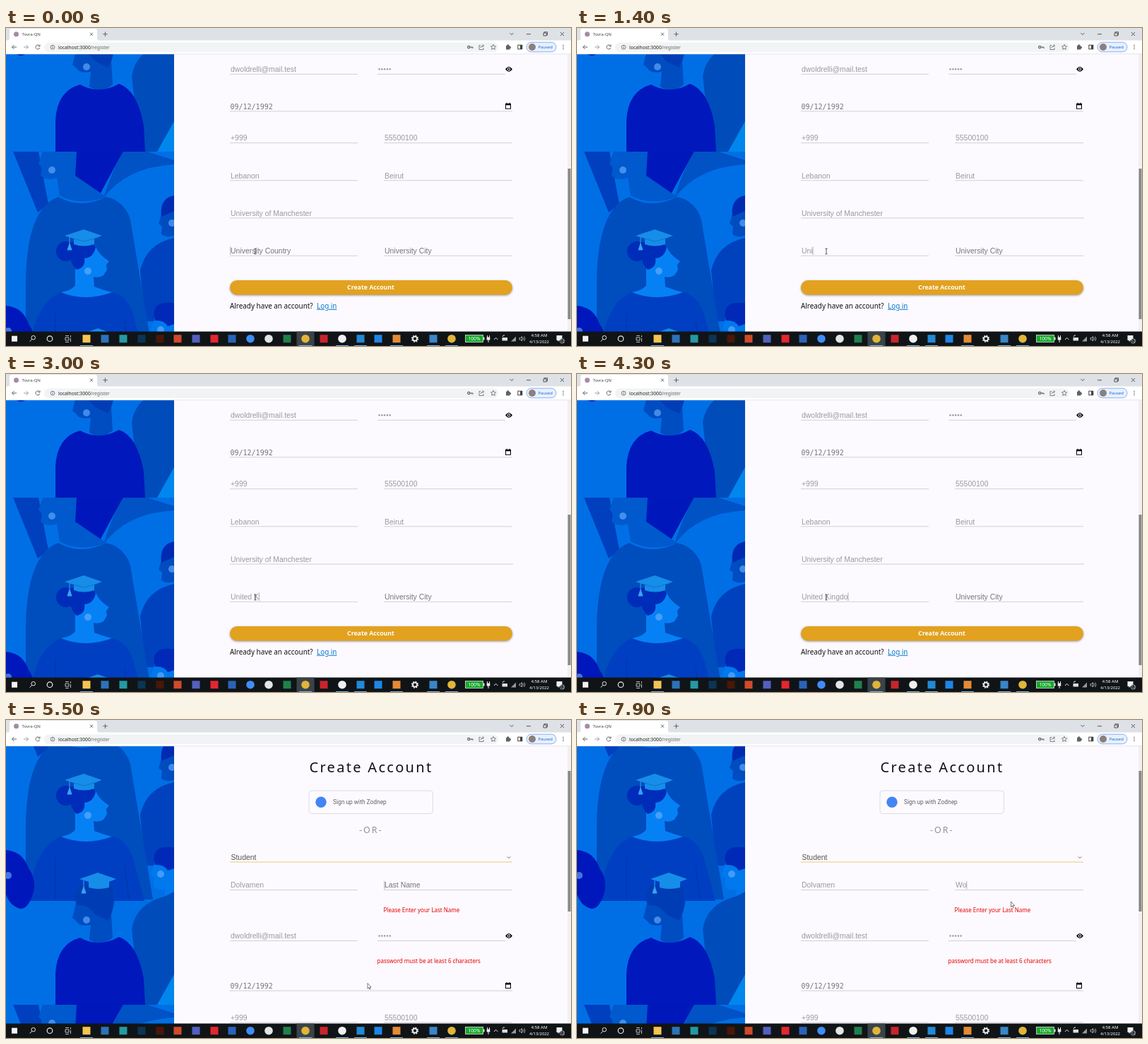
Animation, 800 px wide and 450 px high, one loop 8 s. Source, as an HTML page:

```html
<!DOCTYPE html>
<html lang="en">
<head>
<meta charset="utf-8">
<title>Register form</title>
<style>
  html, body { margin: 0; width: 100%; height: 100%; overflow: hidden; }
  svg { display: block; }
  text { white-space: pre; font-family: "Noto Sans", sans-serif; }
  .input { font: 10.45px "Liberation Sans", Arial, sans-serif; }
  .date { font: 10px "DejaVu Sans Mono", monospace; }
  .line { fill: none; stroke: #5f6368; stroke-width: 1; }
  .white { fill: none; stroke: #e8e8e8; stroke-width: 1; }
</style>
</head>
<body>
<svg id="stage" width="800" height="450" viewBox="0 0 800 450">
  <symbol id="tile" viewBox="0 0 238 437">
    <rect width="238" height="437" fill="#006fe6"/>
    <path d="M10 0H46L60 74L45 86Z" fill="#003fbd"/>
    <path d="M94 0H166Q150 28 130 66L98 40Z" fill="#0018bb"/>
    <path d="M166 0H200L238 12V18Q170 22 138 66Q150 26 166 0Z" fill="#0052c5"/>
    <!-- people on the right -->
    <path d="M238 65Q222 70 221 86L216 102L221 106L220 117Q226 122 238 119Z" fill="#004cc0"/>
    <path d="M238 62Q217 66 220 92L238 84Z" fill="#002ab2"/>
    <path d="M238 122Q199 130 190 168L197 240H238Z" fill="#0042be"/>
    <!-- tall figure -->
    <path d="M52 0L46 17L51 23L49 34Q57 42 72 37L76 62Q105 78 142 64L98 34L100 0Z" fill="#0059cd"/>
    <path d="M74 64Q106 82 142 64Q168 70 176 96L208 288H28V180Q30 80 74 64Z" fill="#004dbd"/>
    <!-- graduate facing right -->
    <path d="M78 199Q112 213 150 199Q171 203 180 230L196 290H32Q40 213 78 199Z" fill="#003fc2"/>
    <path d="M70 228V288M168 240L174 288" stroke="#0035aa" fill="none"/>
    <path d="M98 134H127Q130 145 146 155L142 160L143 167L138 175Q131 179 124 177L125 191Q138 196 150 199Q112 213 78 199Q94 196 98 189Z" fill="#0681f5"/>
    <path d="M96 128Q121 126 127 135Q124 150 111 151Q113 164 100 167Q92 158 92 153A14 14 0 1 1 90 128Z" fill="#002cba"/>
    <path d="M83 119L110 110L136 119L125 123V131Q110 136 96 131V123Z" fill="#168de9"/>
    <path d="M96 123L110 127L125 123" stroke="#0876d2" fill="none"/>
    <path d="M90 121V130L87 139H93L90 130" stroke="#36a4f2" fill="#36a4f2"/>
    <!-- front row -->
    <path d="M0 218Q24 220 32 244Q46 263 36 286Q27 308 13 298Q5 294 0 281Z" fill="#0018bb"/>
    <path d="M238 214Q210 212 210 237L205 253L210 257L209 269Q216 277 226 273L224 288H238Z" fill="#0078ee"/>
    <path d="M238 214Q203 210 211 239Q224 238 229 247L238 244Z" fill="#0029b8"/>
    <path d="M238 277L224 284Q184 294 178 330L190 437H238Z" fill="#004cbb"/>
    <path d="M238 394L214 437H238Z" fill="#0087ed"/>
    <path d="M103 272L98 298L94 314L100 319Q104 327 120 324L118 345Q135 356 151 342L149 309Q158 285 149 268Z" fill="#004cc1"/>
    <path d="M104 268Q93 284 101 296Q116 294 126 309L145 318Q158 291 149 267Z" fill="#003db5"/>
    <path d="M105 342Q131 357 160 341Q186 350 195 400L197 437H70V393Q72 351 105 342Z" fill="#0018bc"/>
    <path d="M104 259L130 250L156 259L146 263V271Q130 275 117 271V263Z" fill="#168de9"/>
    <path d="M110 261V270L107 279H113L110 270" stroke="#36a4f2" fill="#36a4f2"/>
    <g id="emblems" fill="#6fb4ff" opacity=".6"></g>
  </symbol>
  <rect width="800" height="450" fill="#fcfaff"/>
  <g id="page"></g>
  <g id="browser"></g>
  <g id="taskbar"></g>
  <path id="caret" stroke="#888" stroke-width=".7"/>
  <g id="pointer">
    <path id="beam" d="M-1.5 -3.8H1.5M0 -3.8V3.8M-1.5 3.8H1.5" stroke="#333" stroke-width=".8"/>
    <path id="arrow" d="M0 0V7.5L1.7 6L2.8 8.5L4 8L2.9 5.5H5Z" fill="#fff" stroke="#222" stroke-width=".6"/>
    <path id="hand" d="M0 .6Q.8 -.5 1.5 .6V3.4L4.2 4.2V7L3.3 9H0L-2 5.5L-1.2 4.8L0 5.8Z" fill="#fff" stroke="#222" stroke-width=".6"/>
  </g>
</svg>
<script>
const $ = id => document.getElementById(id);
const text = (x, y, str, size, fill, extra = '') =>
  `<text x="${x}" y="${y}" font-size="${size}" fill="${fill}" ${extra}>${str}</text>`;
const rect = (x, y, w, h, fill, extra = '') =>
  `<rect x="${x}" y="${y}" width="${w}" height="${h}" fill="${fill}" ${extra}/>`;
const circle = (x, y, r, fill, extra = '') =>
  `<circle cx="${x}" cy="${y}" r="${r}" fill="${fill}" ${extra}/>`;
const path = (d, cls = 'line', extra = '') => `<path d="${d}" class="${cls}" ${extra}/>`;
const at = (x, y, content) => `<g transform="translate(${x} ${y})">${content}</g>`;
const rule = (x, y, w, color = '#d2d0d4') => rect(x, y, w, 1, color);
const VALUE = '#999', HINT = '#757575';

const field = (x, y, w, str, fill = VALUE, id = '') =>
  text(x + 1, y, str, 10.45, fill, `class="input" ${id && `id="${id}"`}`) + rule(x, y + 2.8, w);

const account = y => field(317, y, 181, 'dwoldrelli@mail.test') +
  [0, 1, 2, 3, 4].map(i => circle(528.5 + i * 3.8, y - 3.7, 1.2, VALUE)).join('') +
  rule(526, y + 2.8, 181) +
  at(712, y - 3.7, '<path d="M-5 0Q0 -7 5 0Q0 7 -5 0Z"/>' + circle(0, 0, 2.2, '#fff') + circle(0, 0, 1.2, '#000'));

const birthday = y => text(317.5, y, '09/12/1992', 10, HINT, 'class="date"') + rule(317, y + 2.6, 400) +
  at(707, y - 9, '<path d="M0 1H8V9H0ZM1 3.5V8H7V3.5Z" fill-rule="evenodd"/><path d="M2 0V2M6 0V2" stroke="#000"/>');

const phone = y => field(317, y, 181, '+999') + field(535, y, 182, '55500100');

const backdrop = top => `<svg y="37" width="238.5" height="393">${
  [0, 437].map(dy => `<use href="#tile" y="${top + dy - 37}" width="238" height="437"/>`).join('')}</svg>`;

const scrollbar = (y, h) => rect(795, 37, 5, 393, '#f1f0f3') + rect(795.5, y, 4, h, '#88878a');

const lowerPage = backdrop(-262) + account(62) + birthday(114.7) + phone(159.3) +
  field(317, 212.5, 181, 'Lebanon') + field(535, 212.5, 182, 'Beirut') +
  field(317, 265.7, 401, 'University of Manchester') +
  field(317, 319, 181, '', HINT, 'country') + field(535, 319, 182, 'University City', HINT) +
  rect(317, 357, 400, 20.5, '#e2a11f', 'rx="10.2" style="filter:drop-shadow(0 1px 1.5px #0006)"') +
  text(516.5, 370.3, 'Create Account', 8.75, '#fff', 'text-anchor="middle" font-weight="700"') +
  text(317, 396.8, 'Already have an account?', 9.9, '#111') +
  text(440, 396.8, 'Log in', 9.9, '#0878cc', 'text-decoration="underline"') +
  scrollbar(199, 213);

const upperPage = backdrop(-34) +
  text(429.5, 73.5, 'Create Account', 20, '#111', 'letter-spacing="2.3"') +
  rect(429, 100, 175.5, 32.5, '#fcfaff', 'rx="4" stroke="#dcdce0"') + circle(446, 116.3, 7.7, '#4285f4') +
  text(463, 119.4, 'Sign up with Zodnep', 8.4, '#5f6368', 'style="font-family:Roboto,sans-serif"') +
  text(500, 159.5, '-OR-', 12.5, '#929292', 'letter-spacing="2"') +
  text(318.5, 198.2, 'Student', 10.45, '#555', 'class="input"') + rule(317, 200.5, 400, '#e5cd7a') +
  path('M709.8 193.4l2.2 2.2l2.2 -2.2') +
  field(317, 237.3, 181, 'Dolvamen') + field(535, 237.3, 182, '', HINT, 'lastName') +
  text(534.5, 272.3, 'Please Enter your Last Name', 8, '#e80000') + account(309.2) +
  text(525.5, 344.3, 'password must be at least 6 characters', 8, '#e80000') +
  birthday(380) + phone(424.7) + scrollbar(72, 199);

$('emblems').innerHTML = [[65, 26], [235, 101], [116, 169], [219, 252], [114, 317], [3, 254]]
  .map(([x, y]) => circle(x, y, 5, '#6fb4ff')).join('');
$('page').innerHTML = `<g id="lower">${lowerPage}</g><g id="upper">${upperPage}</g>`;

$('browser').innerHTML = rect(0, 0, 800, 18, '#dee1e6') +
  '<path d="M2 18Q5 18 5 14V4Q5 1 8 1H126Q129 1 129 4V14Q129 18 132 18Z" fill="#fff"/>' +
  rect(0, 17.5, 800, 19.5, '#fff') + rect(0, 36.5, 800, .7, '#d9dbdf') +
  circle(14.5, 8.7, 3.5, '#a48aa6') + text(22.5, 11, 'Tovra-QN', 6, '#444') +
  path('M119 6.7l4 4m0 -4l-4 4M137.3 8.7h6.5M140.5 5.5v6.5') +
  path('M713.5 7l2.5 2.5l2.5 -2.5M737 8.7h6M762 7V5.7h4.5V10H765.3M761 7h4.2v4H761ZM785 6l5 5m0 -5l-5 5', 'line', 'style="stroke:#333;stroke-width:.8"') +
  rect(54, 20.5, 643, 13.5, '#f1f3f4', 'rx="6.7"') +
  path('M15 27H8.5M11.5 24l-3 3l3 3') +
  path('M25 27h6.5M28.5 24l3 3l-3 3', 'line', 'opacity=".6"') +
  path('M47.4 25.2A3 3 0 1 0 47.8 28M48 23.5v2.4h-2.4') +
  circle(66, 27.2, 2.9, 'none', 'stroke="#5f6368" stroke-width=".8"') + path('M66 26.7v2M66 25.2v.7', 'line', 'stroke-width=".7"') +
  text(74, 29.7, 'localhost:3000<tspan fill="#666">/register</tspan>', 6.75, '#222') +
  circle(655.2, 27, 1.6, 'none', 'stroke="#5f6368" stroke-width="1.2"') + path('M657 27h4v2M659 27v1.5') +
  path('M672 24.5h-2V30.5h6V28M672 28Q672.5 25 676.5 25M674.5 23l2 2l-2 2', 'line', 'style="stroke-width:.8"') +
  path('M690 23.3l1.1 2.4l2.5 .3l-1.9 1.7l.6 2.6l-2.3 -1.3l-2.3 1.3l.6 -2.6l-1.9 -1.7l2.5 -.3Z', 'line', 'style="stroke-width:.8"') +
  rect(708, 25, 5.5, 5.5, '#5f6368') + circle(710.7, 24.6, 1.4, '#5f6368') + circle(713.7, 27.7, 1.4, '#5f6368') +
  rect(724.8, 24.2, 6, 5.6, 'none', 'stroke="#444"') + rect(728, 24, 3, 6, '#444') +
  rect(737, 20.2, 42, 13.6, '#e8f0fe', 'rx="6.8" stroke="#6b9df0" stroke-width=".8"') +
  circle(745, 27, 5, '#8d807a') + text(753.5, 29.2, 'Paused', 5.9, '#1967d2') +
  [24.5, 27, 29.5].map(y => circle(789, y, .8, '#5f6368')).join('');

// Application icons: centre, colour, round or square
const apps = [
  [12, '#f4f4f4'], [114, '#f5c451'], [140, '#2d72b8'], [166, '#249aa2'], [192, '#0c3554'], [218, '#4a1708'],
  [243, '#d14a2a'], [269, '#5460bd'], [295, '#e5262f'], [320, '#2b63b8'], [346, '#3f8df7', 1], [372, '#e4e4e4', 1],
  [398, '#20804b'], [424, '#e0b53a', 1], [450, '#c9242c'], [476, '#f0f0f0', 1], [502, '#2489d6'],
  [527, '#1e86e6'], [553, '#e58a35'], [605, '#3a86c8'], [631, '#e0b53a', 1]];
const open = [114, 424, 476, 502, 553, 605, 631];

$('taskbar').innerHTML = rect(0, 429.5, 800, 20.5, '#101417') + rect(411.5, 429.5, 25, 20.5, '#3c4348') +
  apps.map(([x, color, round]) => round ? circle(x, 439.7, 5.8, color)
    : x === 12 ? rect(8, 435.7, 8, 8, color) : rect(x - 5.5, 434.2, 11, 11, color)).join('') +
  open.map(x => rect(x - 9, 449, 18, 1, '#76b9ed')).join('') +
  circle(38.7, 438.2, 2.8, 'none', 'class="white"') + path('M36.7 440.3l-3 3.3', 'white') +
  circle(62, 439.7, 3.8, 'none', 'stroke="#eee" stroke-width="1.2"') +
  path('M84 438h5v4h-5ZM84 435.5h5M84 444.5h5M91.5 435v2.5M91.5 439v5', 'white', 'style="stroke-width:.8"') +
  circle(579, 439.7, 3, 'none', 'stroke="#eee" stroke-width="1.8"') +
  circle(579, 439.7, 4.4, 'none', 'stroke="#eee" stroke-width="1.5" stroke-dasharray="1.73"') +
  rect(650.5, 434.5, 25, 10, '#17a82c', 'stroke="#d8ead8" stroke-width=".8"') + rect(676, 437.5, 1.5, 4, '#d8ead8') +
  text(663, 442.2, '100%', 6.7, '#fff', 'text-anchor="middle"') +
  path('M681.5 435v3M684.5 435v3M683 441v4', 'white') + rect(680.7, 437.5, 4.6, 4, '#eee') +
  path('M691 441l2.7 -2.7l2.7 2.7', 'white') +
  rect(702.5, 438, 7.5, 4.5, '#ddd') + path('M703 437q1 -3 3 -2', 'white') +
  '<path d="M715 443.5h7v-7Z" fill="#999"/>' +
  path('M727 438.5h1.5l2 -2v6.5l-2 -2H727ZM732 438q1.4 1.7 0 3.5M733.7 436.5q2.4 3.2 0 6.5', 'white', 'style="stroke-width:.7"') +
  text(755, 437.4, '4:58 AM', 6.1, '#fff', 'text-anchor="middle"') +
  text(755, 446.2, '4/13/2022', 5.9, '#fff', 'text-anchor="middle"') +
  '<path d="M779.5 435h8v7h-4l-2 2v-2h-2Z" fill="#eee"/>' +
  circle(787.5, 443, 3.3, '#101417', 'stroke="#ddd" stroke-width=".6"') + text(787.5, 444.7, '12', 4.5, '#fff', 'text-anchor="middle"');

const LOOP = 8000, SUBMIT = 5450;
const entries = {
  country: { hint: 'University Country', value: 'United Kingdom', start: 0,
    keys: [900, 1100, 1300, 1800, 2000, 2200, 2500, 2800, 3300, 3500, 3700, 3900, 4200, 4400] },
  lastName: { hint: 'Last Name', value: 'Wo', start: SUBMIT, keys: [7400, 7700] }
};

function showEntry(id, t) {
  const { hint, value, start, keys } = entries[id];
  const pressed = keys.filter(k => k <= t);
  const node = $(id), count = pressed.length;
  node.textContent = count ? value.slice(0, count) : hint;
  node.setAttribute('fill', count ? VALUE : HINT);
  const x = +node.getAttribute('x') + (count ? node.getComputedTextLength() + .3 : -.2);
  const y = +node.getAttribute('y');
  $('caret').setAttribute('d', `M${x} ${y - 9.5}V${y + 2}`);
  const idle = t - (count ? pressed[count - 1] : start);
  const left = id === 'country' && t > 5350;
  $('caret').style.display = idle % 1000 < 500 && !left ? '' : 'none';
}

function ease(t, from, to) {
  const p = Math.min(1, Math.max(0, (t - from) / (to - from)));
  return p * p * (3 - 2 * p);
}

function showPointer(t) {
  const a = ease(t, 4650, 5300), b = ease(t, 5800, 6600);
  const x = 353 + 159 * a + 102.5 * b, y = 316 + 56.5 * a - 115.5 * b;
  const kind = t < SUBMIT && y < 323 ? 'beam' : t < SUBMIT && y > 357 ? 'hand' : 'arrow';
  for (const id of ['beam', 'arrow', 'hand']) $(id).style.display = id === kind ? '' : 'none';
  $('pointer').setAttribute('transform', `translate(${x} ${y})`);
}

function draw(now) {
  const t = now % LOOP, submitted = t >= SUBMIT;
  $('lower').style.display = submitted ? 'none' : '';
  $('upper').style.display = submitted ? '' : 'none';
  showEntry(submitted ? 'lastName' : 'country', t);
  showPointer(t);
  requestAnimationFrame(() => draw(performance.now() - begin));
}
const begin = performance.now();
draw(0);
</script>
</body>
</html>
```
